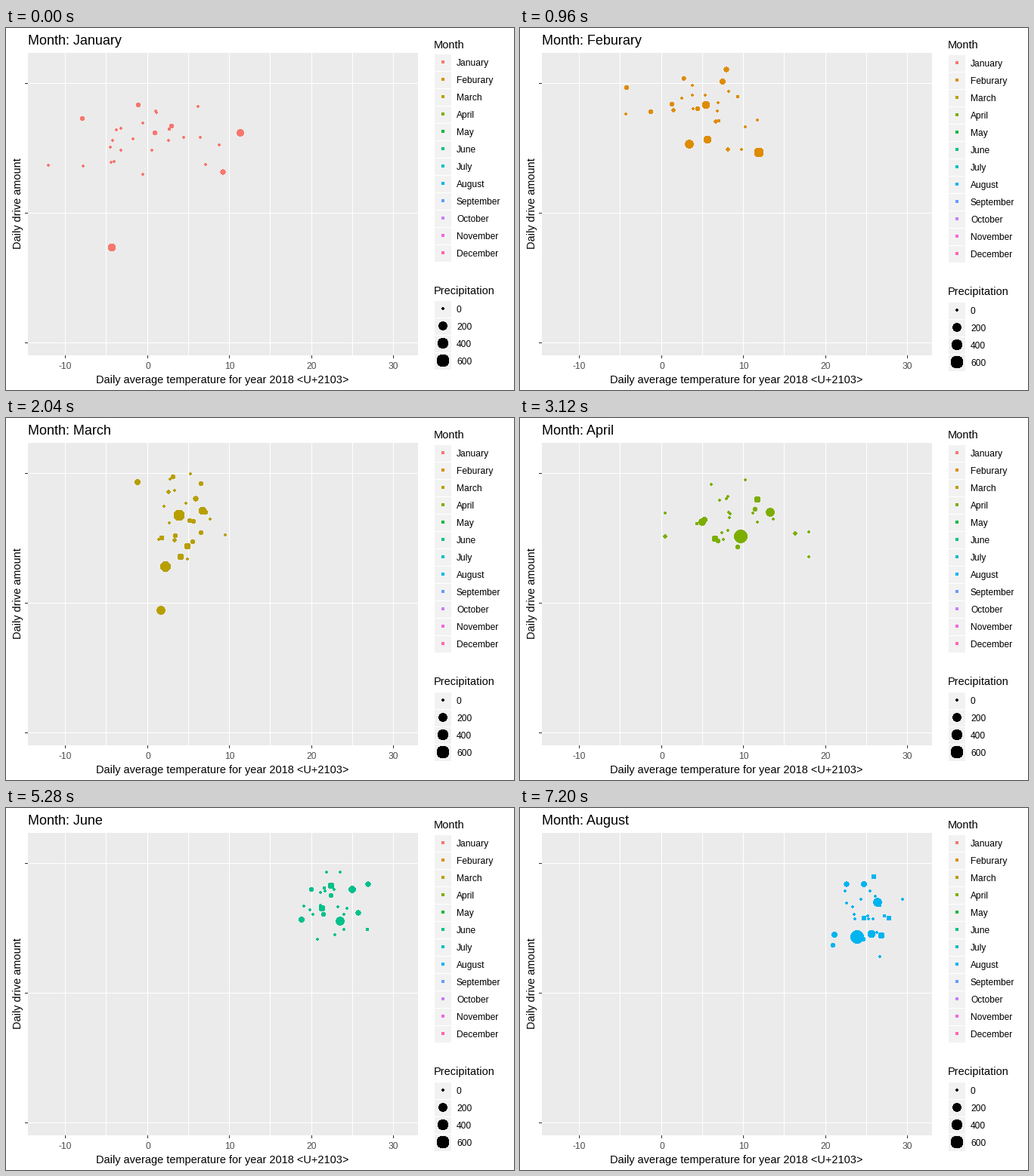
Animation of 672 by 480 pixels, one loop 8 s. Source, as a matplotlib script:

```python
import numpy as np
import matplotlib.pyplot as plt
from matplotlib.animation import FuncAnimation
from matplotlib.collections import PatchCollection
from matplotlib.patches import Circle, Rectangle
from matplotlib.transforms import Affine2D

W, H, DPI = 672, 480, 96
STEP, LOOP = 40, 8000
SMALL, MEDIUM, LARGE = 12, 14.5, 18  # text sizes in pixels
DAYS = 29

MONTHS = ["January", "Feburary", "March", "April", "May", "June", "July",
          "August", "September", "October", "November", "December"]
COLORS = ["#F8766D", "#DE8C00", "#B79F00", "#7CAE00", "#00BA38", "#00C08B",
          "#00BFC4", "#00B4F0", "#619CFF", "#C77CFF", "#F564E3", "#FF64B0"]

# The title switches a little before the dots do.
TITLE_TIMES = [720, 1800, 2880, 3960, 5040, 6120, 7080]
DOT_TIMES = [960, 2040, 3120, 4200, 5280, 6240, 7200]
LEGEND_TIME = 120

# Per month: mean and spread of temperature, mean and spread of height,
# then the wettest days as (temperature, height, rain).
CLOUDS = [
    (0.3, 6.5, 139, 29, [(-4.3, 291, 180), (11.3, 139, 130)]),
    (5.2, 5.0, 104, 30, [(11.9, 165, 290), (3.4, 154, 230), (5.6, 148, 175)]),
    (4.3, 2.9, 130, 30, [(3.9, 129, 430), (2.2, 197, 355), (1.7, 255, 230)]),
    (9.2, 4.6, 133, 27, [(9.7, 157, 700), (13.3, 125, 230), (5, 138, 130)]),
    (19.9, 4.2, 139, 34, [(11.4, 101, 175), (23.6, 136, 130)]),
    (23.0, 2.4, 140, 29, [(23.5, 150, 230)]),
    (25.5, 2.5, 142, 31, [(26.1, 121, 510), (23.6, 200, 230), (23.4, 92, 175)]),
    (25.9, 2.6, 144, 28, [(23.9, 171, 700), (26.4, 125, 230), (25.6, 167, 175)]),
]


def temp_x(temp):
    return 187 + 10.85 * temp


def rain_radius(rain):
    return 2 + 6.5 * np.sqrt(np.asarray(rain) / 600)


plt.rcParams["font.family"] = "Liberation Sans"
fig = plt.figure(figsize=(W / DPI, H / DPI), dpi=DPI, facecolor="white")
ax = fig.add_axes([0, 0, 1, 1])
ax.set_xlim(0, W)
ax.set_ylim(H, 0)
ax.axis("off")

# Pixel offsets for the parts of the legend that settle after the start.
still, near, far = Affine2D(), Affine2D(), Affine2D()


def box(x, y, w, h, color, shift=still):
    ax.add_patch(Rectangle((x, y), w, h, fc=color, lw=0,
                           transform=shift + ax.transData))


def label(x, y, text, size, shift=still, **style):
    return ax.text(x, y, text, fontsize=size * 72 / DPI, va="baseline",
                   transform=shift + ax.transData, **style)


def dots(x, y, radii, color, shift=still):
    # Hard-edged discs fill every pixel they touch, so draw them slimmer.
    discs = [Circle(p, r - 0.6) for *p, r in zip(x, y, radii)]
    return ax.add_collection(PatchCollection(
        discs, facecolors=color, linewidths=0, antialiaseds=False,
        transform=shift + ax.transData, zorder=2), autolim=False)


def cloud(seed, temp, temp_spread, height, height_spread, wettest):
    rng = np.random.default_rng(seed)
    count = DAYS - len(wettest)
    zx, zy = np.clip(rng.normal(size=(2, count)), -1.9, 1.9)
    rain = rng.exponential(30, count) * (rng.random(count) < 0.4)
    wet_temp, wet_height, wet_rain = np.array(wettest).T
    x = temp_x(np.append(temp + temp_spread * zx, wet_temp))
    y = np.append(height + height_spread * zy, wet_height)
    radii = rain_radius(np.append(rain, wet_rain))
    return x.round(), y.round(), radii


def legend(top, names, radii, colors, shift):
    rows = top + 23 * np.arange(len(names))
    box(567, top, 22, 23 * len(names), "#F2F2F2", shift)
    for y, name in zip(rows, names):
        box(566, y, 24, 1, "white", shift)
        label(596, y + 16, name, SMALL, shift)
    dots([578] * len(names), rows + 11, radii, colors, shift)


# Panel, grid and axes
box(29, 33, 516, 401, "#EBEBEB")
for temp in range(-10, 31, 5):
    x = int(temp_x(temp))
    box(x, 33, 1, 401, "white")
    if temp % 10 == 0:
        box(x, 434, 1, 4, "#333333")
        label(x + 0.5, 452, str(temp), SMALL, color="#4D4D4D", ha="center")
for y in range(73, 418, 172):
    box(29, y, 516, 1, "white")
    box(25, y, 4, 1, "#333333")
label(286.5, 471, "Daily average temperature for year 2018 <U+2103>", MEDIUM,
      ha="center")
label(20, 233, "Daily drive amount", MEDIUM, ha="center", rotation=90,
      rotation_mode="anchor")
title = label(28.6, 22, "", LARGE)

# Legends
label(565.5, 27, "Month", MEDIUM)
legend(35, MONTHS, [2.5] * 12, COLORS, near)
label(565.5, 354, "Precipitation", MEDIUM, near)
amounts = range(0, 601, 200)
legend(363, [str(a) for a in amounts], rain_radius(amounts), "black", far)

layers = [dots(*cloud(seed, *shape), color)
          for seed, (shape, color) in enumerate(zip(CLOUDS, COLORS))]


def stage(times, now):
    return int(np.searchsorted(times, now, side="right"))


def draw(frame):
    now = frame * STEP
    lift = -1 if now < LEGEND_TIME else 0
    near.clear().translate(0, lift)
    far.clear().translate(0, 2 * lift)
    title.set_text("Month: " + MONTHS[stage(TITLE_TIMES, now)])
    shown = stage(DOT_TIMES, now)
    for i, layer in enumerate(layers):
        layer.set_visible(i == shown)
    return [title, *layers]


anim = FuncAnimation(fig, draw, frames=LOOP // STEP, interval=STEP,
                     repeat=True, repeat_delay=0, blit=False)
plt.show()
```
